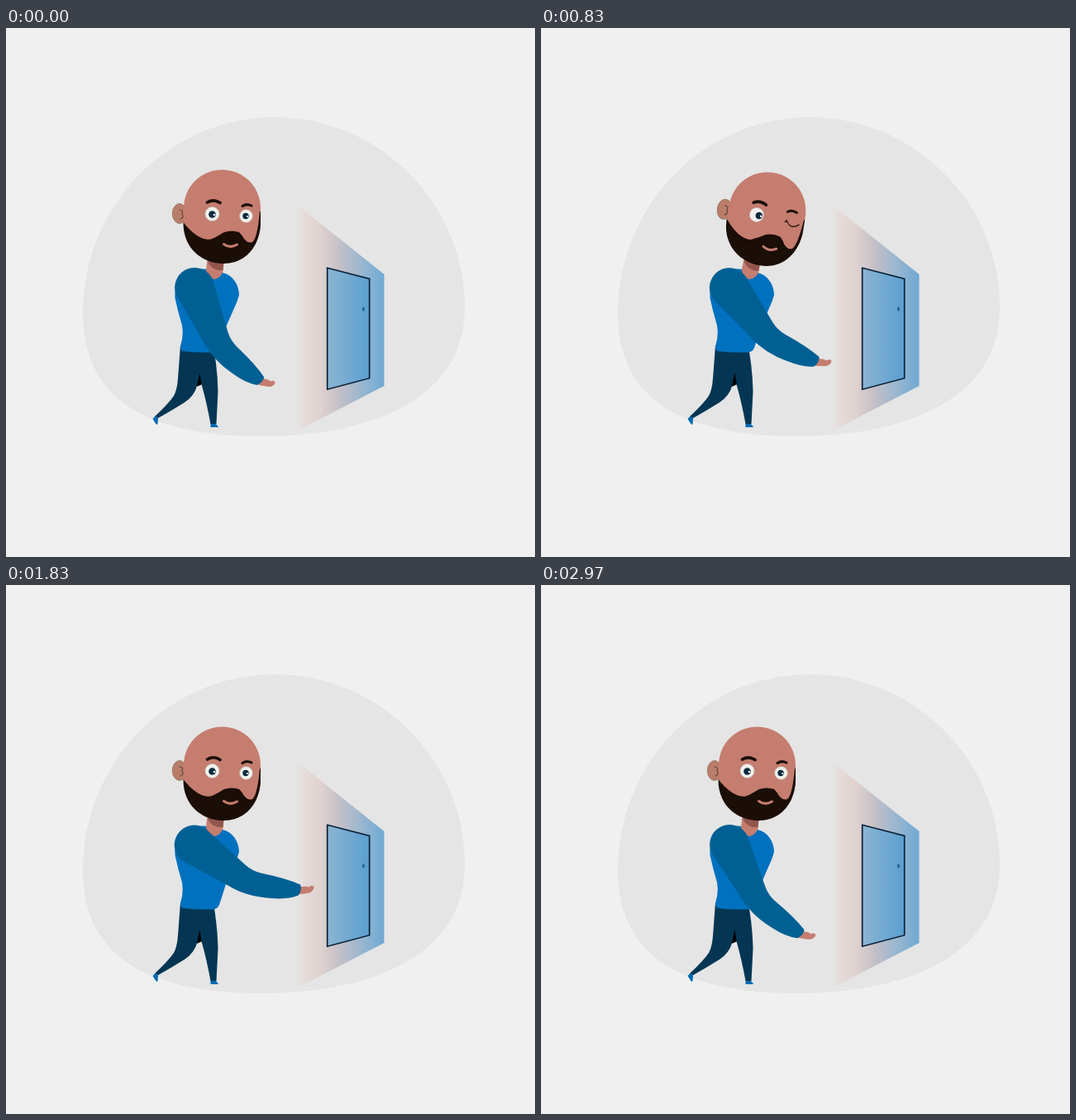
An HTML page that plays this animation: 640 by 640 pixels, repeating every 3010 ms.

```html
<!DOCTYPE html>
<html lang="en">
<head>
<meta charset="utf-8">
<title>Man at the door</title>
<style>
html, body { margin: 0; width: 100%; height: 100%; overflow: hidden; background: #f0f0f0; }
svg { display: block; width: 100vw; height: 100vh; }
.line { fill: none; stroke-linecap: round; stroke-linejoin: round; }
</style>
</head>
<body>
<svg viewBox="0 0 640 640">
  <defs>
    <linearGradient id="wall">
      <stop offset="0" stop-color="#e6dedb" stop-opacity="0"/>
      <stop offset=".1" stop-color="#e5dbd8"/>
      <stop offset=".28" stop-color="#dfd2cf"/>
      <stop offset=".5" stop-color="#c3bfc7"/>
      <stop offset=".8" stop-color="#8fb4d1"/>
      <stop offset="1" stop-color="#70a9d3"/>
    </linearGradient>
    <linearGradient id="door">
      <stop offset="0" stop-color="#8cb5d3"/>
      <stop offset="1" stop-color="#5a9fd0"/>
    </linearGradient>
  </defs>

  <path fill="#e5e5e5" d="M93 345C93 213 198 108 325 108S555 212 555 338C555 450 440 494 310 494C150 494 93 435 93 345Z"/>

  <path fill="url(#wall)" d="M351 213L457.500 298V433L351 488Z"/>
  <path fill="url(#door)" stroke="#0b2237" stroke-width="1.700" d="M388.700 290.300L439.700 303.400V423.700L388.700 437.200Z"/>
  <ellipse cx="432.5" cy="340" rx="1.6" ry="2.8" fill="#26699a"/>

  <!-- legs -->
  <path fill="#006bb0" d="M181 469L177.500 473L182 480L183.500 479L184 472ZM247.500 477V483H257Q256 480 253 479Z"/>
  <path d="M234 412L230.500 434L237.500 431Z"/>
  <path fill="#043653" d="M211 384L251.500 388Q256 415 256.500 440L254.500 479H247.500Q242.500 452 237 433L234.500 417L231 433Q228 445 216 453Q200 463 184 472L180.500 469.500Q197 454 203 445Q207 438 208 424Z"/>

  <!-- torso -->
  <path fill="#0071bf" d="M222 293Q245 289 262 296C275 299 282 311 282 323Q280 331 276 339L266 362Q262 375 258 387Q256 392 250 392.500Q230 393 214 391Q210 389 211.500 383Q215 372 213 360Q208 343 204.500 327Q203 300 222 293Z"/>
  <g id="neck">
    <path fill="#c57d6f" d="M244 276H264L262.500 295Q259 303 252 304Q243 301 242 293Z"/>
    <path fill="#93564c" d="M244.500 280H264L262.500 293Q250 294 244.500 284Z"/>
  </g>

  <g id="arm">
    <path id="hand" fill="#c57d6f" d="M352 367L363 366Q365 368 368 365.500Q372 364.500 372 368Q370 374 363 374.500L353 376Z"/>
    <path fill="#006094" d="M246 299L290 340Q298 347 308 349.500Q338 356 355.500 364Q358 370 353 377Q340 382 320 380Q290 378 268 364L213 333.500A24 24 0 1 1 246 299Z"/>
  </g>

  <g id="head">
    <ellipse cx="210" cy="224.500" rx="8.700" ry="12" fill="#b97e6a" stroke="#9a7a66"/>
    <path fill="#c57d6f" d="M215 218A46.500 46.500 0 0 1 308 218V240Q305 275 263 280Q218 270 215 236Z"/>
    <path class="line" stroke="#6b4238" stroke-width="1.200" d="M210 220Q215 220 213 225Q216 229 211 231"/>
    <path fill="#1a0e06" d="M214.500 235C222 245 236 258 248 255.500Q256 252 264 247Q273 244 282 247Q286 251 288 255Q293 261 298 259Q304 255 307 222H308V238C306 267 288 285 263 285S214 267 214.500 235Z"/>
    <path class="line" stroke="#c57d6f" stroke-width="3" d="M263.500 261.500Q271 267 279.500 262"/>
    <g>
      <circle cx="249.500" cy="225" r="8.500" fill="#f1f1ec" stroke="#c9c0b8" stroke-width=".7"/>
      <g class="pupil">
        <circle cx="249.500" cy="225.500" r="4.300" fill="#0d2a40"/>
        <circle cx="252" cy="226" r="1.300" fill="#fff"/>
      </g>
    </g>
    <g id="rightEye">
      <circle cx="290.500" cy="227.500" r="7.800" fill="#f1f1ec" stroke="#c9c0b8" stroke-width=".7"/>
      <g class="pupil">
        <circle cx="290" cy="227.500" r="3.700" fill="#0d2a40"/>
        <circle cx="292" cy="228" r="1.100" fill="#fff"/>
      </g>
    </g>
    <path id="wink" class="line" stroke="#24130c" stroke-width="1.200" d="M286 225.500Q292 237 302 229M284.500 228L287.500 227"/>
    <g id="brows" class="line" stroke="#1a0e06">
      <path stroke-width="3.600" d="M243.500 211Q251 206.500 259 211.500"/>
      <path stroke-width="3" d="M286 215.500Q291 212 297 215"/>
    </g>
  </g>
</svg>
<script>
const LOOP = 3010, ARM_SWING = 31, HAND_BEND = 12;
const get = id => document.getElementById(id);
const [neck, arm, hand, head, rightEye, wink, brows] =
  ['neck', 'arm', 'hand', 'head', 'rightEye', 'wink', 'brows'].map(get);
const pupils = document.querySelectorAll('.pupil');

// Time in ms and how far the hand is raised, in degrees around the shoulder
const lift = [[170, 0], [430, 2.7], [670, 8.8], [830, 13.4], [1230, 24.7], [1370, 26.9],
  [1770, 29], [2000, 29.4], [2270, 28.6], [2630, 15.9], [2830, 7.5], [2970, 3.2], [3010, 2.3]];
const REACH = 28.6;

const ease = (t, from, to) => {
  const x = Math.min(1, Math.max(0, (t - from) / (to - from)));
  return (1 - Math.cos(Math.PI * x)) / 2;
};

const slope = (keys, i) => {
  if (i === 0) return 0;
  const a = keys[i - 1], b = keys[Math.min(i + 1, keys.length - 1)];
  return (b[1] - a[1]) / (b[0] - a[0]);
};

// Smooth cubic curve through the keys
function curve(keys, t) {
  if (t <= keys[0][0]) return keys[0][1];
  const i = keys.findIndex(k => k[0] >= t) - 1;
  if (i < 0) return keys[keys.length - 1][1];
  const [t0, v0] = keys[i], [t1, v1] = keys[i + 1];
  const d = t1 - t0, x = (t - t0) / d, y = 1 - x;
  return v0 * y * y * (1 + 2 * x) + v1 * x * x * (1 + 2 * y)
    + d * x * y * (slope(keys, i) * y - slope(keys, i + 1) * x);
}

const set = (el, value) => el.setAttribute('transform', value);

function draw(now) {
  const t = now % LOOP;
  const tilt = ease(t, 170, 410) - ease(t, 860, 1180);
  const raise = 6.5 * (ease(t, 1800, 2280) - ease(t, 2320, 2860));
  const open = 1 - Math.min(1, tilt * 1.1);
  const drop = 1 - curve(lift, t) / REACH;

  set(arm, `rotate(${ARM_SWING * drop} 229 315)`);
  set(hand, `rotate(${-HAND_BEND * drop} 354 371)`);
  set(head, `rotate(${9 * tilt} 249 298)`);
  set(neck, `rotate(${5 * tilt} 252 302)`);
  set(rightEye, `translate(0 ${228 * (1 - open)}) scale(1 ${open})`);
  set(brows, `translate(0 ${-raise})`);
  pupils.forEach(p => set(p, `translate(${3 * tilt} 0)`));
  wink.style.opacity = open < 0.15 ? 1 : 0;
  rightEye.style.opacity = open < 0.15 ? 0 : 1;
}

const start = performance.now();
function tick() {
  draw(performance.now() - start);
  requestAnimationFrame(tick);
}
tick();
</script>
</body>
</html>
```
